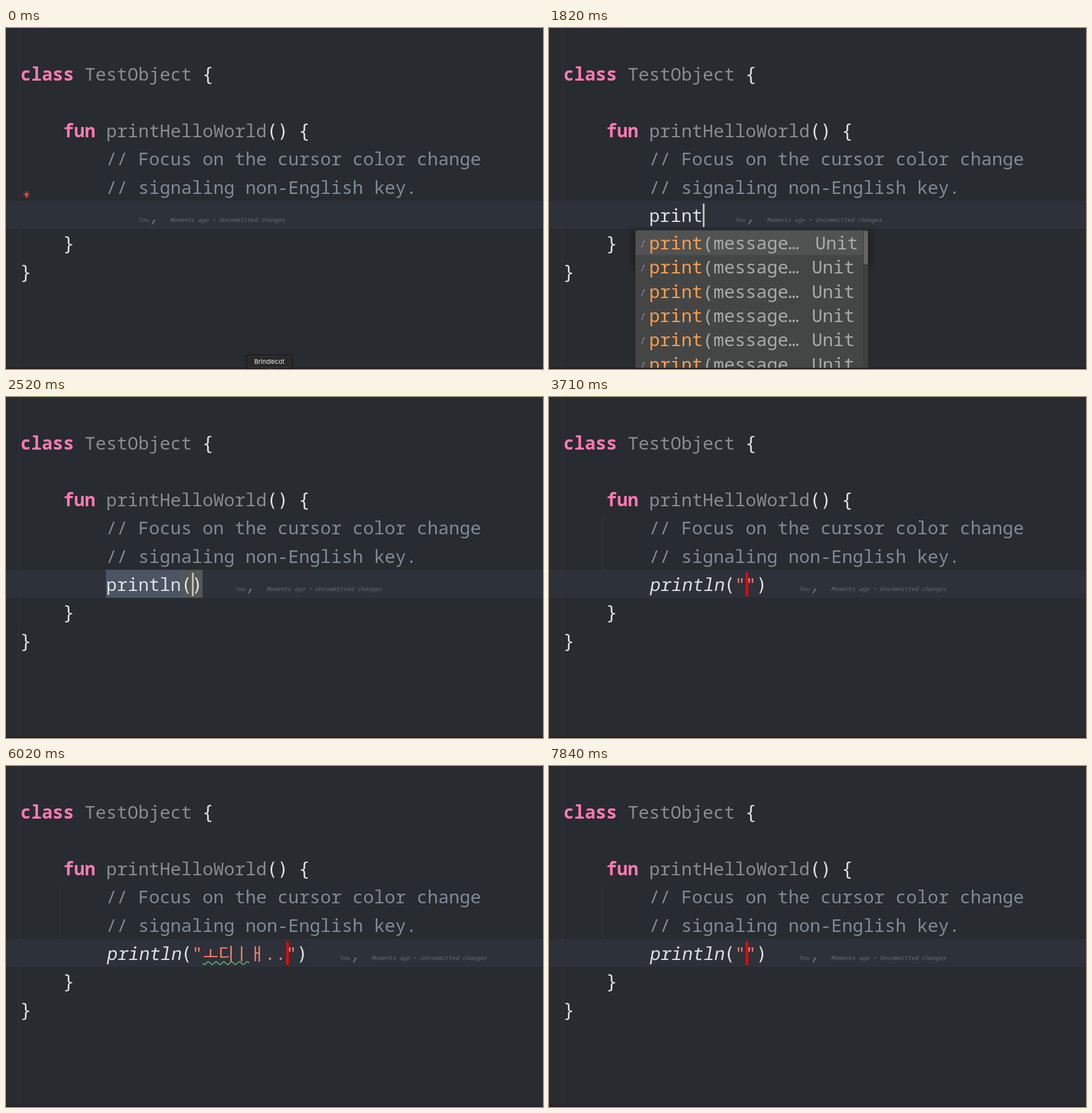
These frames come from a looping animation (940x596 px, 8000 ms). An HTML page:

```html
<!DOCTYPE html>
<html lang="en">
<head>
<meta charset="utf-8">
<title>Cursor color</title>
<style>
  html, body { margin: 0; width: 100%; height: 100%; overflow: hidden; background: #282b2f; }
  svg { display: block; width: 100vw; height: 100vh; }
  text { font: 31.25px "Noto Sans Mono", "DejaVu Sans Mono", monospace; fill: #dfe0e1; white-space: pre; }
  .kw { font-weight: 700; fill: #ff7ab2; }
  .name { fill: #8b8c90; }
  .note { fill: #7f8c98; }
  .pair { font-family: "DejaVu Sans Mono", monospace; }
  .str { fill: #ff8170; }
  .kor { font: 29.6px "Noto Sans CJK KR", "Noto Sans CJK JP", "Noto Sans CJK", sans-serif; fill: #ff8170; }
  .blame { font-size: 10.2px; font-style: italic; fill: #666b73; }
  .comma { font-style: italic; fill: #666b73; }
  .hit { fill: #ff9d4e; }
  .item { fill: #a9abaa; }
  .fn { font: italic 11px "Noto Serif", serif; fill: #b78be0; }
  .tip { font: 8.7px Inter, sans-serif; fill: #e4e5e6; }
  .link { fill: #5b9dd2; }
  .dock { font: 11px Inter, sans-serif; fill: #f2f2f2; text-anchor: middle; }
</style>
</head>
<body>
<svg viewBox="0 0 940 596" preserveAspectRatio="none">
  <defs>
    <filter id="blur" x="-10%" y="-30%" width="120%" height="160%"><feGaussianBlur stdDeviation="5"/></filter>
  </defs>
  <rect width="940" height="596" fill="#282b2f"/>
  <rect y="302" width="940" height="49" fill="#2d313a"/>
  <path d="M23.5 0V596" stroke="#303338"/>
  <path d="M0 0H3Q0 0 0 3Z" fill="#15171a"/>
  <g id="code"></g>
  <g id="live"></g>
  <rect y="594" width="940" height="2" fill="#201c22"/>
  <g id="dock">
    <rect x="421.8" y="572" width="79" height="23" rx="3" fill="#29292a" stroke="#0d0d0e" stroke-width="1.4"/>
    <rect x="422.9" y="573.1" width="76.8" height="20.8" rx="2.2" fill="none" stroke="#48494b" stroke-width=".8"/>
    <path d="M454 594.5H468L461 600Z" fill="#29292a"/>
    <text class="dock" x="461" y="587">Brindlecot</text>
  </g>
</svg>
<script>
const LOOP = 8000, CH = 18.75, KOR = 27.2, LEFT = 25.2, TOP = 92, LINE = 49.4;
const BASE = TOP + 5 * LINE, START = LEFT + 8 * CH;
const $ = id => document.getElementById(id);
const col = n => LEFT + n * CH;

const text = (x, y, s, cls = '') => `<text x="${x.toFixed(2)}" y="${y.toFixed(1)}" class="${cls}">${s}</text>`;
const slanted = (x, y, s) => `<text transform="translate(${x} ${y}) skewX(-10)">${s}</text>`;
const rect = (x, y, w, h, fill, more = '') =>
  `<rect x="${x}" y="${y}" width="${w}" height="${h}" fill="${fill}" ${more}/>`;

// Value of the last step that has begun
const at = (t, steps) => steps.reduce((v, [from, val]) => t >= from ? val : v, steps[0][1]);

const lines = [
  [0, 0, 'class', 'kw'], [0, 6, 'TestObject', 'name'], [0, 17, '{', 'pair'],
  [2, 4, 'fun', 'kw'], [2, 8, 'printHelloWorld', 'name'], [2, 23, '()', 'pair'], [2, 26, '{', 'pair'],
  [3, 8, '// Focus on the cursor color change', 'note'],
  [4, 8, '// signaling non-English key.', 'note'],
  [6, 4, '}', 'pair'], [7, 0, '}', 'pair']
];
$('code').innerHTML = lines.map(([row, c, s, cls]) => text(col(c), TOP + row * LINE, s, cls)).join('');

const typed = [[0, 0], [1190, 1], [1400, 2], [1540, 3], [1610, 4], [1680, 5], [2030, 6], [2170, 7]];
const blamed = [[0, 0], [1330, 1], [1470, 2], [1610, 3], [1680, 4], [1750, 5], [2100, 6], [2170, 7]];
const strings = [
  [3150, ''], [4060, 'ㅗ'], [4690, 'ㅗㄷ'], [4900, 'ㅗ디'], [4970, 'ㅗ디ㅣ'], [5110, 'ㅗ디ㅣㅐ'],
  [5880, 'ㅗ디ㅣㅐ.'], [6020, 'ㅗ디ㅣㅐ..'], [6440, 'ㅗ디ㅣㅐ...'], [6720, 'ㅗ디ㅣㅐ..'],
  [6930, 'ㅗ디ㅣㅐ.'], [7000, 'ㅗ디ㅣㅐ'], [7070, 'ㅗ디ㅣ'], [7140, 'ㅗ디'], [7560, 'ㅗ'], [7840, '']
];
const waves = [[0, 0], [5460, 4], [5880, 3], [6300, 4], [7840, 0]];

function blame(end) {
  const x = end + 56;
  return text(x, 338.5, 'You', 'blame') + text(x + 17.8, 338.5, ',', 'comma') +
    text(x + 56, 338.5, 'Moments ago • Uncommitted changes', 'blame');
}

function caret(x, red, w = 3) {
  return red ? rect(x + .3, 307, 4.4, 41, '#f20505') : rect(x + .3, 307, w, 41, '#c6c8c9');
}

function bulb() {
  let rays = '';
  for (let a = 150; a <= 390; a += 48) {
    const r = a * Math.PI / 180, c = Math.cos(r), s = Math.sin(r);
    rays += `M${36 + c * 4.4} ${291 + s * 4.4}L${36 + c * 6.4} ${291 + s * 6.4}`;
  }
  return `<path d="${rays}" stroke="#cf3d34" stroke-width="1.3"/><circle cx="36" cy="290.8" r="3.2" fill="#e8463b"/>` +
    rect(34.5, 293, 3, 4, '#d83f36');
}

function emptyPopup(opacity) {
  const dots = [403, 406.3, 409.6].map(y => `<circle cx="546" cy="${y}" r="1.1" fill="#d9dadb"/>`).join('');
  return `<g opacity="${opacity}">` + rect(147, 354, 416, 68, '#121416', 'opacity=".6" filter="url(#blur)"') +
    '<path d="M150.5 416V596M560.5 416V596" stroke="#1f2124"/>' +
    rect(150.5, 352.5, 409, 63.5, '#2a2c2f', 'rx="3" stroke="#3a3c3d"') +
    rect(152, 354, 406, 43, '#525453', 'rx="2"') +
    text(159, 409, 'Press ^. to choose the selected (or first) suggestion and insert a dot afterwards', 'tip') +
    text(488, 409, 'Next Tip', 'tip link') + dots + '</g>';
}

function listPopup(t) {
  const word = t < 2170 ? 'print' : 'println';
  let s = rect(147, 354, 416, 66, '#121416', 'opacity=".6" filter="url(#blur)"') +
    rect(150.5, 352.5, 409, 260, '#434645', 'rx="3" stroke="#1e2022"') +
    rect(152, 354.5, 400, 42.5, '#515352', 'rx="2"') +
    rect(550, 354, 9, 242, '#3c3f3f') + rect(551, 355, 7, 58, '#656766', 'rx="2"');
  for (let i = 0; i < 6; i++) {
    const y = 387 + i * 42.35;
    const tail = word === 'print' ? '(message…' : i || t < 2310 ? '(messa…' : '()';
    s += text(162, y - 7, 'ƒ', 'fn') + text(START, y, word, 'hit') +
      text(START + word.length * CH, y, tail, 'item') + text(i ? 460 : 466, y, 'Unit', 'item');
  }
  return s;
}

// Plain typing of the call name with the completion list
function typing(t) {
  const n = at(t, typed), end = START + n * CH;
  let s = t < 630 ? bulb() : '';
  if (t >= 2310) s += rect(175, 302, 131, 49, '#4a5462');
  s += text(START, BASE, 'println'.slice(0, n)) + blame(START + at(t, blamed) * CH);
  if (t >= 630 && (t < 1120 || t >= 1190)) s += caret(end, false, t >= 1330 && t < 1540 ? 1.8 : 3);
  if (t >= 1470) s += listPopup(t);
  else if (t >= 1330) s += emptyPopup(t < 1400 ? .5 : 1);
  return s;
}

// The finished call: brackets, then quotes and what is between them
function call(t) {
  const open = START + 7 * CH, quoted = t >= 3150;
  let s = '', x = open + CH;
  if (t < 2590) s += rect(175, 302, 131, 49, '#4a5462');
  if (!quoted) s += rect(306, 302, 38, 49, '#555756');
  if (t >= 2870) s += '<path d="M94.5 205V302" stroke="#33363a"/>';
  s += (t >= 2870 ? slanted : text)(START, BASE, 'println') + text(open, BASE, '(', 'pair');
  if (!quoted) return s + text(x, BASE, ')', 'pair') + blame(x + CH) + caret(x);

  const body = at(t, strings), from = x + CH;
  s += text(x, BASE, '"', 'str');
  x = from;
  for (const c of body) {
    s += c === '.' ? text(x, BASE, c, 'str') : text(x + .5, BASE, c, 'kor');
    x += c === '.' ? CH : KOR;
  }
  if (t >= 4060 && t < 5880) s += rect(x - KOR, 339.6, KOR, 1.2, '#c9cbcc');
  const wavy = Math.min(at(t, waves), body.replace(/\./g, '').length);
  if (wavy) s += `<path d="M${from} 344.5q3.4 5 6.8 0${'t6.8 0'.repeat(wavy * 4 - 1)}" fill="none" stroke="#62a56c" stroke-width="1.9"/>`;
  s += text(x, BASE, '"', 'str') + text(x + CH, BASE, ')', 'pair') + blame(x + 2 * CH);
  if (t < 3850 || t >= 4060) s += caret(x, t >= 3710);
  return s;
}

let shown;
function draw(t) {
  const next = t < 2520 ? typing(t) : call(t);
  if (next !== shown) $('live').innerHTML = shown = next;
  $('dock').setAttribute('opacity', at(t, [[0, 1], [70, .75], [140, .5], [210, .25], [280, 0]]));
}

function tick(now) {
  draw(now % LOOP);
  requestAnimationFrame(tick);
}
draw(0);
requestAnimationFrame(tick);
</script>
</body>
</html>
```
